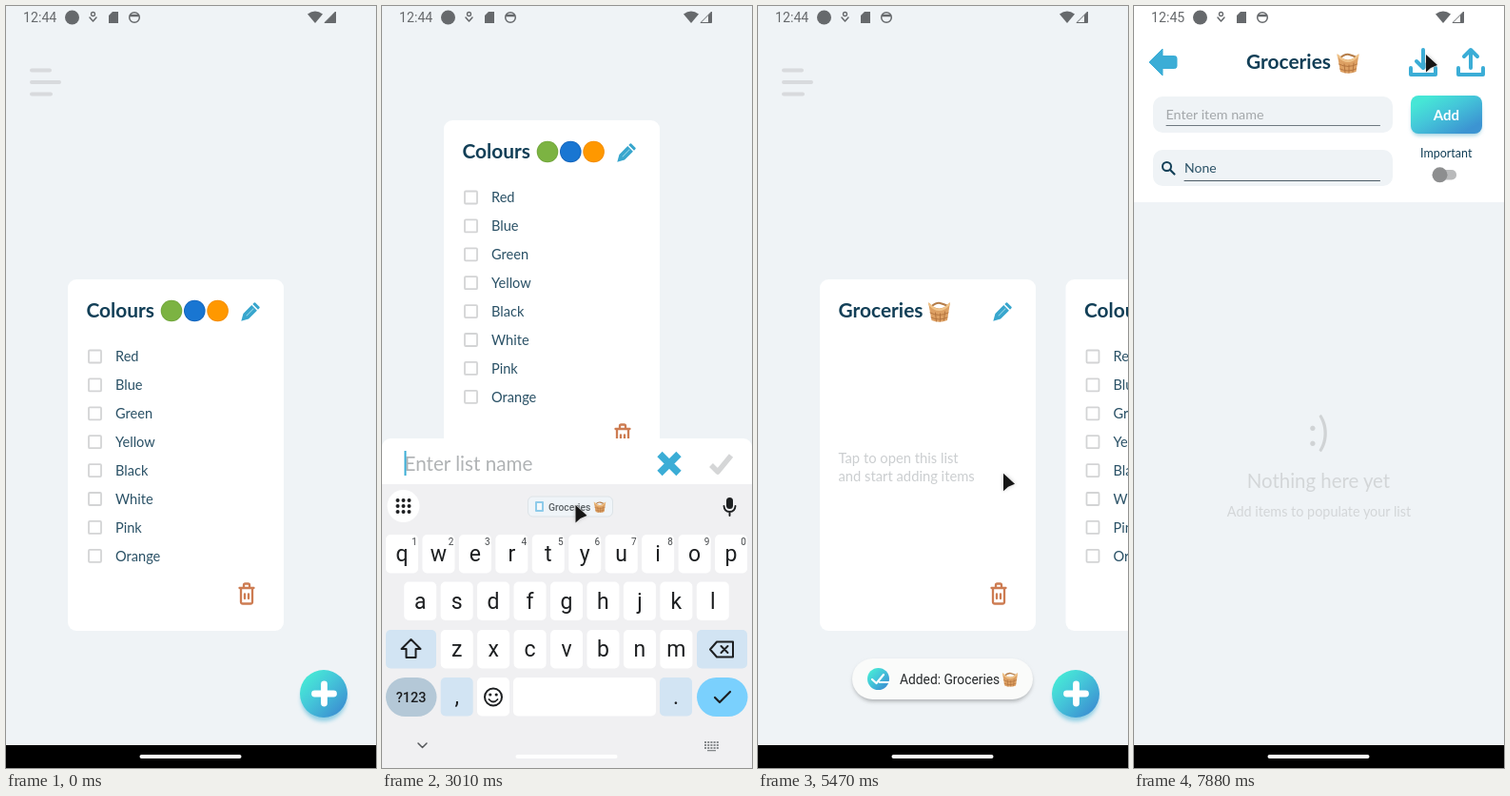
These frames come from a looping animation (389 by 800 pixels, 8 s). An HTML page:

```html
<!DOCTYPE html>
<html lang="en">
<head>
<meta charset="utf-8">
<title>Shopping lists</title>
<style>
html, body { margin: 0; width: 100%; height: 100%; overflow: hidden; background: #eff3f6 }
svg { display: block; font-family: Lato, "Open Sans", sans-serif }
.r { font-family: Roboto, Inter, sans-serif }
.l { fill: none; stroke-linecap: round; stroke-linejoin: round }
</style>
</head>
<body>
<svg id="stage" width="389" height="800" viewBox="0 0 389 800"></svg>
<script>
const INK = '#123f57', SOFT_INK = '#2a5166', BLUE = '#3badd6', PALE = '#eff3f6', DARK = '#1d1f21', GREY = '#66696c';
const $ = id => document.getElementById(id);
const rect = (x, y, w, h, r, fill, more = '') =>
  `<rect x="${x}" y="${y}" width="${w}" height="${h}" rx="${r}" fill="${fill}" ${more}/>`;
const disc = (x, y, r, fill, more = '') => `<circle cx="${x}" cy="${y}" r="${r}" fill="${fill}" ${more}/>`;
const text = (x, y, size, s, fill = INK, more = '') =>
  `<text x="${x}" y="${y}" font-size="${size}" fill="${fill}" ${more}>${s}</text>`;
const title = (x, y, s) => text(x, y, 20.9, s, INK, 'font-weight="700"');
const line = (d, color, w = 2, more = '') =>
  `<path class="l" d="${d}" stroke="${color}" stroke-width="${w}" ${more}/>`;
const fill = (d, color, more = '') => `<path d="${d}" fill="${color}" ${more}/>`;
const group = (id, s, more = '') => `<g id="${id}" ${more}>${s}</g>`;
const basket = (cx, cy, size) =>
  `<use href="#basket" transform="translate(${cx} ${cy}) scale(${size / 24})"/>`;
const range = n => [...Array(n).keys()];
const mid = 'text-anchor="middle"';

const defs = `<defs>
<linearGradient id="aqua" x1="0" y1="0" x2="1" y2="1">
<stop offset=".15" stop-color="#46e6d6"/><stop offset=".45" stop-color="#44c6d9"/>
<stop offset=".85" stop-color="#3c94d2"/></linearGradient>
<filter id="soft" x="-30%" y="-30%" width="160%" height="180%"><feGaussianBlur stdDeviation="2"/></filter>
<g id="basket">${line('M-9 -5Q-3 -10 1 -9T9 -6', '#b57d49', 2)}
${fill('M-11.500 -10Q0 3 11.500 -10L8.500 9Q0 12.500 -8 9Z', '#dda063')}
${line('M-10.500 -8Q0 4 10.500 -8', '#f0c48a', 2.2)}
${line('M-9.500 1Q0 6 9.500 1M-8.500 6Q0 10 8.500 6M-4 1L-3 10M1 2V10M6 0L5 9', '#b1723d', .9)}</g>
</defs>`;

const pencil = `<g transform="translate(256.5 321.5) rotate(45)">
${fill('M-4 -10Q-4 -11 -3 -11H3Q4 -11 4 -10V-8H-4ZM-4 -6.500H4V6L0 13L-4 6Z', '#38a6cd')}
${line('M0 -5V5', '#8dd0e5', 1)}</g>`;
const trash = line('M245.500 611H260.500M247 612V625.500Q247 627.500 249 627.500H257Q259 627.500 259 625.500V612M250 610V608Q250 606.500 251.500 606.500H254.500Q256 606.500 256 608V610M251 617.500V622M255 617.500V622', '#cd7c52', 2.3);
const card = (id, s) => group(id, rect(65, 287, 227, 369, 9, '#fff') + pencil + trash + s);

const ball = (x, base, shade) => disc(x, 320, 11.3, shade) + disc(x, 319.8, 10.5, base);
const items = ['Red', 'Blue', 'Green', 'Yellow', 'Black', 'White', 'Pink', 'Orange'];
const colours = card('colours', title(84.5, 327, 'Colours') +
  ball(174, '#7cb342', '#71a63c') + ball(198.3, '#1976d2', '#1565bb') + ball(222.6, '#ff9800', '#f48c00') +
  items.map((s, i) => rect(87, 361.5 + i * 29.9, 13, 13, 1, 'none', 'stroke="#d3d4d5" stroke-width="1.8"') +
    text(115, 373.3 + i * 29.9, 14.6, s, SOFT_INK)).join(''));
const groceries = card('groceries', title(84.5, 327, 'Groceries') +
  basket(190.5, 321, 24) + text(84.5, 480, 14.75, 'Tap to open this list', '#cbced0') +
  text(84.5, 498.5, 14.75, 'and start adding items', '#cbced0'));

const home = group('home', line('M27 67.500H46M27 80H56M27 92.500H47', '#d8dadd', 4) + colours + groceries +
  disc(334, 727, 24, '#8fcfe4', 'filter="url(#soft)"') + disc(334, 722, 25, 'url(#aqua)') +
  line('M334.500 712V732M324.500 722H344.500', '#fff', 6.8));

const tray = x => line(`M${x - 13} 65V72H${x + 13}V65`, BLUE, 4);
const field = y => rect(20, y, 252, 38, 10, PALE);
const page = group('page', rect(0, 0, 389, 800, 0, PALE) + rect(0, 0, 389, 206, 0, '#fff') +
  fill('M16 59L30 45V52.500H42.500Q45 52.500 45 55V63Q45 65.500 42.500 65.500H30V73Z', BLUE, `stroke="${BLUE}" stroke-linejoin="round"`) +
  title(118, 66, 'Groceries') + basket(225, 60, 24) +
  tray(304) + line('M304 46V64M297 58L304 65L311 58', BLUE, 4) +
  tray(354) + line('M354 65V47M347 53L354 46L361 53', BLUE, 4) +
  field(95) + field(151) + text(33.5, 119, 14.3, 'Enter item name', '#a3a7aa') + text(53, 175, 14, 'None', SOFT_INK) +
  line('M34 125.500H258.500', '#6d7880', 1) + line('M53 183.500H258.500', '#4d5c66', 1) +
  disc(34.5, 168.5, 4.5, 'none', `stroke="${INK}" stroke-width="2"`) + line('M38 172L42.500 176.500', INK, 2.2) +
  rect(292, 100, 73, 36, 8, '#9fd0e0', 'filter="url(#soft)"') + rect(291, 94, 75, 40, 8, 'url(#aqua)') +
  text(328.5, 119.5, 15, 'Add', '#fff', mid + ' font-weight="700"') + text(301, 159, 12.5, 'Important') +
  rect(317, 172, 22, 10.5, 5, '#b9babb') + disc(321.5, 177.3, 8, '#8d8e8f') +
  text(193.5, 462, 43, ':)', '#d0d3d5', mid) + text(194, 506, 20.4, 'Nothing here yet', '#d3d6d8', mid) +
  text(194.5, 536, 14.4, 'Add items to populate your list', '#d3d6d8', mid));

const sheet = group('sheet', rect(0, 0, 389, 170, 9, '#fff') +
  text(23.5, 34, 20.7, 'Enter list name', '#b0b3b5', 'id="hint"') +
  group('entry', text(23.5, 34, 20.7, 'Groceries', SOFT_INK) + basket(126, 27, 22)) +
  rect(23.5, 13, 2, 26, 0, BLUE, 'id="caret"') +
  line('M292 16.500L312 36.500M312 16.500L292 36.500', BLUE, 7.5, 'style="stroke-linecap:butt"') +
  line('M346 28L353 35L367 18', '#d5d6d7', 5.5, 'id="accept" style="stroke-linecap:butt"'));

const key = (x, y, w, s, color = '#fff') => rect(x, y, w, 40.5, 5, color) +
  text(x + w / 2, y + 28, 23, s, DARK, mid);
const row = (s, x, y) => [...s].map((c, i) => key(x + i * 38.45, y, 34, c)).join('');
const board = group('board', rect(0, 502, 389, 400, 0, '#f0f0f2') +
  disc(22.5, 525, 17, '#fff') + range(9).map(i => disc(16.5 + i % 3 * 6, 519 + (i / 3 | 0) * 6, 2, DARK)).join('') +
  group('chip', rect(153.500, 515, 89, 21, 5, '#eff4f8', 'stroke="#dde3e7"') +
    rect(161, 520, 9, 11, 1, '#8ecbea') + rect(163, 522, 5, 7, 0, '#f3f8fb') +
    text(175, 529.5, 10.3, 'Groceries', '#5a6064', 'font-weight="500"') + basket(229, 526, 13)) +
  rect(362, 516, 7, 12, 3.5, DARK) + line('M359.500 525Q360 531 365.500 531T371.500 525M365.500 531V535', DARK, 1.9) +
  row('qwertyuiop', 4, 555) + range(10).map(i => text(34 + i * 38.45, 566, 10, (i + 1) % 10, '#44474a', mid)).join('') +
  row('asdfghjkl', 23.2, 604.5) + row('zxcvbnm', 61.7, 655) +
  key(4, 655, 53, '', '#d2e4f3') + line('M30.500 665L20.500 675H25.500V684H35.500V675H40.500Z', DARK) +
  key(331, 655, 53, '', '#d2e4f3') + line('M345 675.500L352 667.500H369V683.500H352ZM356.500 672L363.500 679M363.500 672L356.500 679', DARK) +
  rect(4, 705, 53.5, 41, 20.5, '#b4c8d7') + text(30.7, 731, 14.5, '?123', DARK, mid + ' font-weight="500"') +
  key(61.7, 705, 34, ',', '#d2e4f3') + key(100, 705, 34, '') + key(138, 705, 150, '') + key(292, 705, 34, '.', '#d2e4f3') +
  disc(117, 725.5, 9, 'none', `stroke="${DARK}" stroke-width="2"`) + disc(113.8, 723, 1.6, DARK) + disc(120.2, 723, 1.6, DARK) +
  line('M112.500 728Q117 733 121.500 728', DARK, 1.8) +
  rect(331, 705, 53.5, 41, 20.5, '#7ad0fd') + line('M350 726L355 731L366 720', DARK, 2.2) +
  line('M38 774L42.500 778.500L47 774', '#55585b', 1.5) +
  range(15).map(i => rect(339 + i % 5 * 3.2, 772 + (i / 5 | 0) * 3, 2, 2, 0, '#85888b')).join('') +
  rect(342, 781, 9, 1.3, 0, '#85888b'), 'class="r"');

const status = group('status', rect(0, 0, 389, 23, 0, PALE, 'id="strip"') +
  text(18, 17, 14.2, '12:44', GREY, 'id="clock"') + disc(69.5, 12, 7.5, GREY) +
  disc(91.5, 8.5, 2, 'none', `stroke="${GREY}" stroke-width="1.3"`) + line('M88 12L91.500 16L95 12', GREY, 1.5) +
  fill('M112 6H118V18H108V10Z', GREY) + disc(135, 12, 5.3, 'none', `stroke="${GREY}" stroke-width="1.5"`) +
  line('M131 10H139', GREY, 2.5) + fill('M317 8.500Q325 2.500 333 8.500L325 18Z', GREY) +
  fill('M346.500 6V17.500H335Z', GREY, `id="signal" stroke="${GREY}"`) + fill('M346.500 6V17.500H343V9.500Z', GREY), 'class="r"');

const toast = group('toast', rect(100, 688, 188, 42, 21, '#aaaeb1', 'filter="url(#soft)"') +
  rect(99, 685, 190, 43, 21.5, '#fafbfa') + disc(126.5, 706.5, 11.5, 'url(#aqua)') +
  line('M120 707L124.500 711L132 702M128 710H138', '#fff', 2.2) +
  text(149, 711.5, 13.8, 'Added: Groceries', '#26292b') + basket(265, 707, 17), 'class="r"');

const arrow = 'M-.5 0V18.500L4.500 14L11.500 11Z';
const cursor = group('cursor', fill(arrow, '#777', 'opacity=".45" filter="url(#soft)"') +
  fill(arrow, '#151515', 'stroke="#eee" stroke-width=".8" stroke-linejoin="round" paint-order="stroke"'));

$('stage').innerHTML = defs + rect(0, 0, 389, 800, 0, PALE) + home +
  rect(0, 0, 389, 800, 0, '#000', 'id="dim"') + page + rect(0, 776, 389, 300, 0, '#000', 'id="bar"') +
  sheet + board + rect(140.5, 786, 107, 4, 2, '#fff', 'id="pill"') + status + toast + cursor;

// Linear track: pairs of [step, value], held outside its ends
function track(n, ...keys) {
  const i = keys.findIndex(k => k[0] > n);
  if (i < 0) return keys.at(-1)[1];
  if (!i) return keys[0][1];
  const [a, u] = keys[i - 1], [b, v] = keys[i];
  return u + (v - u) * (n - a) / (b - a);
}
const set = (id, name, v) => $(id).setAttribute(name, v);
const move = (id, x, y) => set(id, 'transform', `translate(${x} ${y})`);
const show = (id, on) => set(id, 'opacity', +on);

function draw(t) {
  const n = Math.floor(Math.max(0, t - 1) * .015); // 15 steps per second
  const pan = track(n, [26, 0], [28, -60], [29, -120], [30, -156], [31, -167], [64, -167], [65, -140],
    [66, -99], [68, -99], [69, -20], [70, 0]);
  const open = track(n, [92, 0], [93, .167], [94, .59], [95, .905], [96, 1]);
  const enter = track(n, [70, 0], [72, .45], [74, .85], [77, 1]);
  const typed = n >= 46;

  move('home', -194.5 * open, pan);
  move('colours', 258.5 * enter, 0);
  move('groceries', 258.5 * (enter - 1), 0);
  show('groceries', n > 70);
  show('dim', .4 * open);
  move('page', 389 * (1 - open), 0);
  move('bar', 0, pan);

  move('sheet', 0, 621 + pan);
  show('sheet', n >= 28 && n < 63);
  show('hint', !typed);
  show('entry', typed);
  set('caret', 'x', typed ? 139 : 23.5);
  show('caret', (n + 8) % 15 < 9);
  set('accept', 'stroke', typed ? BLUE : '#d5d6d7');

  move('board', 0, track(n, [26, 300], [27, 240], [28, 140], [29, 50], [30, 0], [64, 0], [65, 10], [66, 25]));
  show('board', n >= 27 && n < 69);
  show('chip', !typed);
  set('pill', 'fill', n < 46 || n > 69 ? '#fff' : n === 69 ? '#000' : '#444648');

  set('strip', 'fill', open ? '#fff' : PALE);
  $('clock').textContent = n < 113 ? '12:44' : '12:45';
  set('signal', 'fill', n < 19 ? GREY : 'none');
  show('toast', track(n, [71, 0], [75, 1], [100, 1], [106, 0]));

  const late = n >= 116;
  move('cursor',
    late ? track(n, [116, 356], [117, 328], [118, 307.5])
      : track(n, [19, 386], [25, 351], [31, 351], [40, 229], [43, 204], [46, 204], [57, 356], [61, 360], [70, 360], [81, 277], [84, 221.5]),
    late ? track(n, [116, 54], [118, 51])
      : track(n, [19, 770], [25, 726], [31, 726], [40, 556], [43, 524], [46, 524], [57, 484], [61, 481], [70, 481], [81, 489], [84, 494]));
  show('cursor', n >= 20 && n < 104 || late);
}

const start = performance.now();
function tick() {
  draw((performance.now() - start) % 8000);
  requestAnimationFrame(tick);
}
tick();
</script>
</body>
</html>
```
